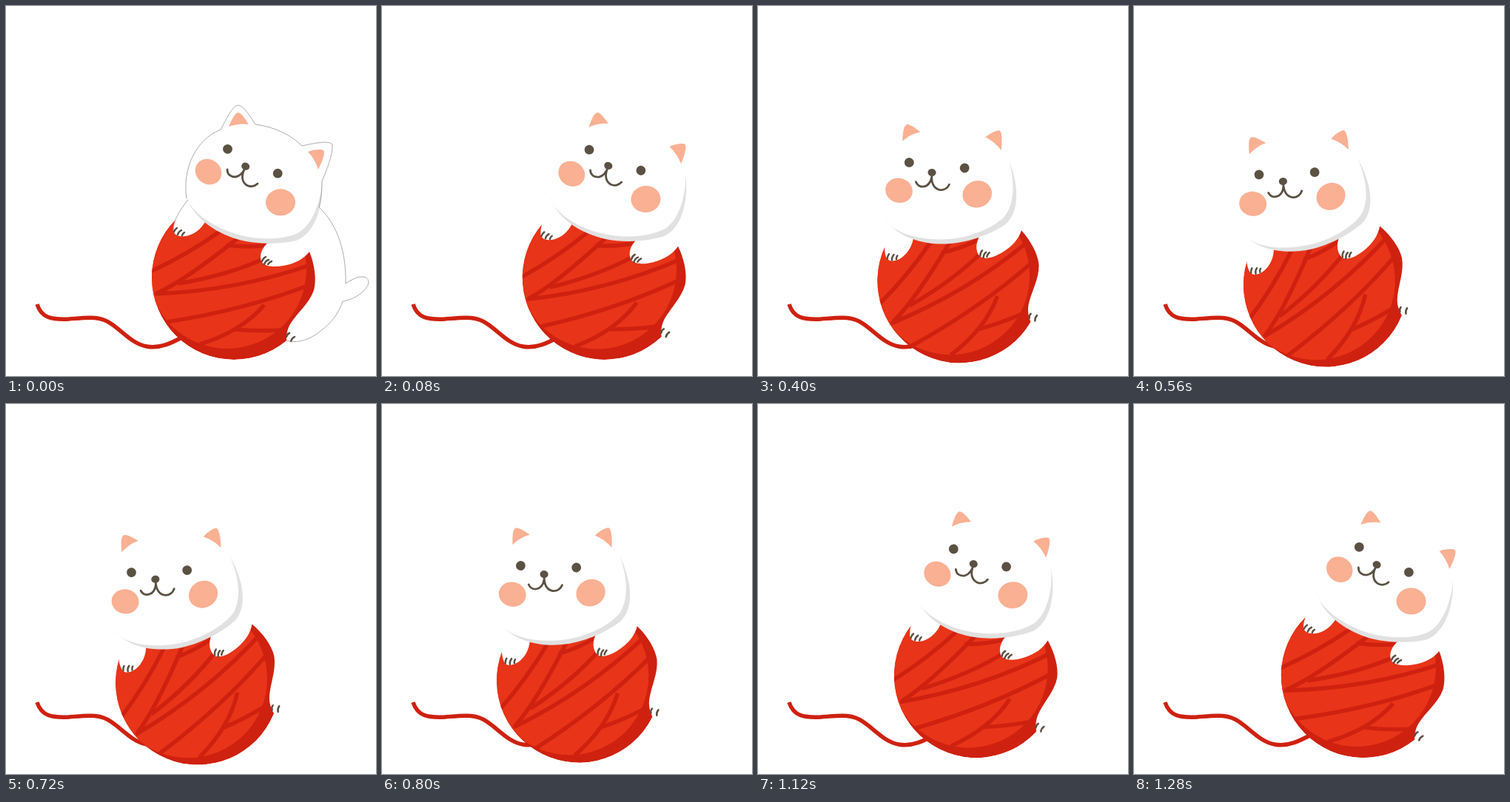
An HTML page for the animation above (1360 ms loop, 500 by 500 pixels).

```html
<!DOCTYPE html>
<html lang="en">
<head>
<meta charset="utf-8">
<title>Cat on a ball of yarn</title>
<style>
  html, body { margin: 0; width: 100%; height: 100%; overflow: hidden; background: #fff; }
  svg { display: block; width: 100vw; height: 100vh; }
  .line { fill: none; stroke-linecap: round; stroke-linejoin: round; }
  .yarn { stroke: #cf2110; stroke-width: 5.5; stroke-linecap: butt; }
  .ink { stroke: #5b5143; stroke-width: 2.8; }
  .hair { stroke: #8a8a8a; stroke-width: .7; }
  .dark { fill: #cf2110; }
  .red { fill: #e83418; }
  .white { fill: #fff; }
  .shade { fill: #e1e1e1; }
  .pink { fill: #fab093; }
  .eye { fill: #5b5143; }
</style>
</head>
<body>
<svg viewBox="0 0 500 500">
  <defs>
    <clipPath id="ball"><circle cx="308" cy="367" r="111"/></clipPath>
  </defs>

  <path class="line yarn" d="M42,403 C48,422 62,424 85,423 C110,421 127,418 143,430 C160,442 172,457 190,460 C210,464 228,453 245,444"/>

  <g id="roller">
    <g clip-path="url(#ball)">
      <circle class="dark" cx="308" cy="367" r="111"/>
      <circle class="red" cx="299" cy="356" r="107"/>
      <path class="line yarn" d="M195,359 Q245,336 290,304
        M204,388 Q242,371 313,314
        M298,323 Q328,327 354,323
        M233,375 Q300,364 352,340
        M201,389 Q312,385 414,349
        M217,427 Q322,411 410,377
        M262,457 Q318,440 349,404
        M309,437 Q340,440 374,438"/>
    </g>

    <!-- body, paws and tail -->
    <path class="white" d="M246,262 C232,279 226,292 226,303 C227,310 234,312 243,311 C254,309 263,302 269,292 L290,270 Z"/>
    <path class="white" d="M356,318 C346,326 342,336 345,345 C350,353 363,353 375,351 C391,348 402,342 410,332
      C417,349 420,370 416,384 C410,402 393,415 384,430 C379,439 379,446 379,452 C390,456 408,453 424,440
      C438,430 449,417 455,399 C470,397 488,385 490,374 C490,364 478,362 459,375 C460,335 449,296 423,272 Z"/>

    <!-- head -->
    <path class="shade" d="M243,255 C251,285 282,306 312,315 C340,323 372,322 392,317 C416,308 429,275 427,232 L330,230 Z"/>
    <path class="white" d="M290,167 C297,155 306,134 314,134 C322,136 330,149 337,160 C362,163 385,174 400,189
      C414,186 436,181 441,187 C442,202 432,224 427,237 C425,265 415,294 396,306
      C377,316 342,317 314,309 C283,300 254,282 244,260 C238,222 255,181 290,167 Z"/>
    <path class="pink" d="M301,163 C304,156 309,144 314,144 C319,145 324,154 328,160 Q314,158 301,163 Z"/>
    <path class="pink" d="M408,197 C414,194 426,193 429,195 C432,199 426,213 422,221 Q417,206 408,197 Z"/>
    <ellipse class="pink" cx="273.5" cy="224" rx="18.5" ry="16.6" transform="rotate(38 273.5 224)"/>
    <ellipse class="pink" cx="371" cy="265.3" rx="20" ry="18"/>
    <circle class="eye" cx="299.5" cy="193.3" r="6.4"/>
    <circle class="eye" cx="367.2" cy="226.2" r="6.4"/>
    <ellipse class="eye" cx="323.7" cy="216.7" rx="5.6" ry="5" transform="rotate(26 323.7 216.7)"/>
    <path class="line ink" d="M299,221 C299,228 304,231 310,231 C316,230 320,226 323,219 C318,228 318,237 325,242 C330,245 336,244 340,240"/>

    <!-- claws -->
    <path class="line ink" style="stroke-width:2.5" d="M227,305 Q228,302 231,300 M232,309 Q233,305 237,303 M238,310 Q239,307 241,306
      M346,345 Q347,341 351,339 M349,349 Q351,344 355,343 M354,349 Q356,346 359,345
      M379,447 Q380,443 383,442 M385,453 Q386,449 390,447"/>

    <path id="hair" class="line hair" d="M226,303 C226,292 232,279 246,262 M244,260 C238,222 255,181 290,167
      C297,155 306,134 314,134 C322,136 330,149 337,160 C362,163 385,174 400,189
      C414,186 436,181 441,187 C442,202 432,224 427,237 C427,250 426,262 423,272
      C449,296 460,335 459,375 C478,362 490,364 490,374 C488,385 470,397 455,399
      C449,417 438,430 424,440 C408,453 390,456 379,452"/>
  </g>
</svg>
<script>
  const STEP = 80, COUNT = 17, TURN = 8;
  const LOW = -32.4, HIGH = 1;
  const PIVOT = "302.7 469";
  const roller = document.getElementById("roller");
  const hair = document.getElementById("hair");

  // The whole figure rocks about the floor point at an even speed each way.
  function angleAt(step) {
    return step < TURN
      ? LOW * step / TURN
      : LOW + (HIGH - LOW) * (step - TURN) / (COUNT - 1 - TURN);
  }

  function draw(ms) {
    const step = Math.floor(ms / STEP) % COUNT;
    roller.setAttribute("transform", `rotate(${angleAt(step)} ${PIVOT})`);
    hair.style.display = step === 0 ? "" : "none";
  }

  const start = performance.now();
  function tick() {
    draw(performance.now() - start);
    requestAnimationFrame(tick);
  }
  tick();
</script>
</body>
</html>
```
